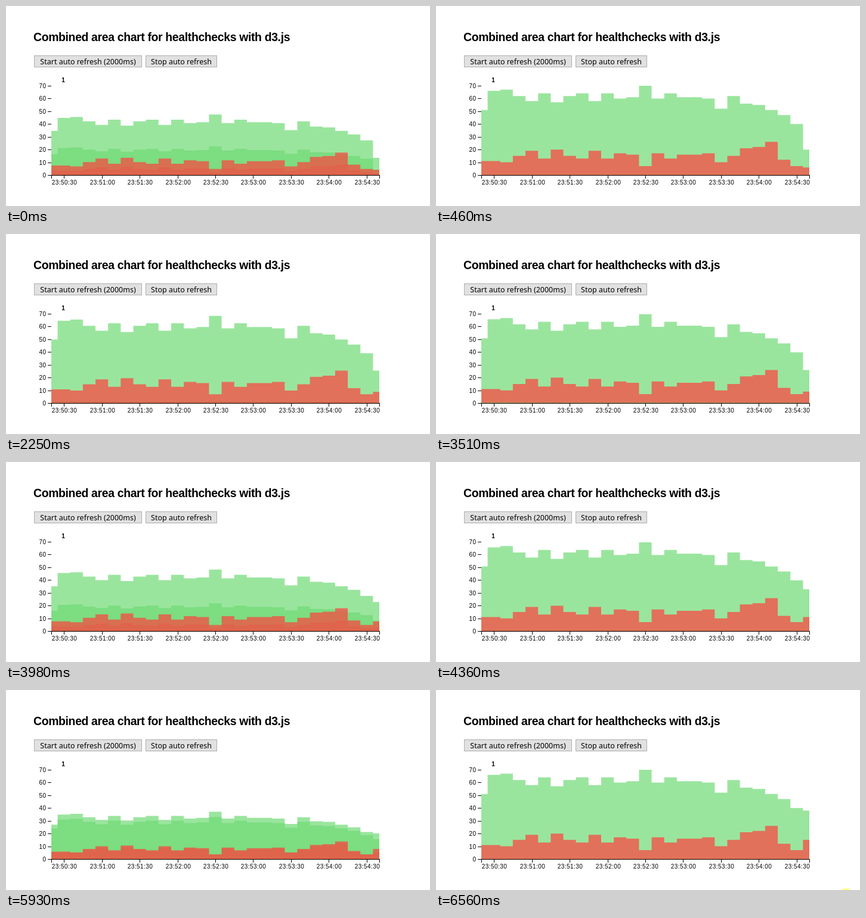
Recreate the animation shown at these times as an HTML page with a canvas. Size 711 by 336 pixels, loop 6.64 s.

```html
<!DOCTYPE html>
<html lang="en">
<head>
<meta charset="utf-8">
<title>Combined area chart</title>
<style>
  html, body { margin: 0; width: 100%; height: 100%; overflow: hidden; background: #fff; }
  canvas, svg { position: absolute; left: 0; top: 0; display: block; }
  text { font-family: "Liberation Sans", Arial, sans-serif; fill: #000; }
  .title { font-size: 19.4px; font-weight: bold; letter-spacing: -0.34px; }
  .button { font: 12.5px "Noto Sans", "Open Sans", sans-serif; text-anchor: middle; }
  .box { fill: #e1e1e1; stroke: #adadad; }
  .axis { font-size: 10px; letter-spacing: 0.42px; }
  .count { font-size: 10px; font-weight: bold; text-anchor: middle; }
  .line { fill: none; stroke: #000; shape-rendering: crispEdges; }
</style>
</head>
<body>
<canvas id="areas" width="711" height="336"></canvas>
<svg id="labels" width="711" height="336" viewBox="0 0 711 336">
  <text class="title" x="46" y="59">Combined area chart for healthchecks with d3.js</text>
  <rect class="box" x="47.5" y="83.5" width="180" height="19"/>
  <text class="button" x="137.5" y="98">Start auto refresh (2000ms)</text>
  <rect class="box" x="234.5" y="83.5" width="119" height="19"/>
  <text class="button" x="294" y="98">Stop auto refresh</text>
  <text class="count" x="96" y="128">1</text>
</svg>
<script>
const LOOP = 6640, STEP = 77.5, DURATION = 1000;
const LEFT = 76, RIGHT = 626, BASE = 284, UNIT = 150 / 70;
const GREEN = "rgba(111,219,118,0.7)", RED = "rgba(255,65,62,0.7)";

const total = [51, 66, 67, 62, 58, 64, 57, 62, 64, 58, 64, 60, 61, 70,
  60, 64, 61, 61, 60, 52, 62, 56, 55, 51, 47, 40];
const failed = [11, 11, 10, 15, 19, 13, 20, 15, 13, 19, 13, 17, 16, 7,
  17, 13, 16, 16, 17, 10, 15, 21, 22, 26, 12, 7];
// newest [total, failed] sample after each refresh
const latest = [[13, 3], [20, 6], [26, 9], [33, 11], [38, 15]];
// first repaint and start time of each transition
const refreshes = [[-7.5, -576], [1470, 1425], [3510, 3402], [5440, 5395]];
const GAP = (RIGHT - LEFT) / total.length;

const ctx = document.getElementById("areas").getContext("2d");
const svg = document.getElementById("labels");

function add(tag, attrs, label = "") {
  const node = document.createElementNS("http://www.w3.org/2000/svg", tag);
  for (const key in attrs) node.setAttribute(key, attrs[key]);
  node.textContent = label;
  svg.append(node);
}

function buildAxes() {
  add("path", { class: "line", d: `M${LEFT + 0.5},290V284.5H${RIGHT + 0.5}V290` });
  for (let v = 0; v <= 70; v += 10) {
    const y = Math.round(BASE - v * UNIT) + 0.5;
    add("path", { class: "line", d: `M70,${y}H76` });
    add("text", { class: "axis", x: 67.4, y: y + 3.5, "text-anchor": "end" }, v);
  }
  for (let i = 0; i < 9; i++) {
    const x = Math.round(LEFT + GAP * (1 + 3 * i)) + 0.5;
    const half = i + 1;
    const label = `23:${50 + (half >> 1)}:${half % 2 ? "30" : "00"}`;
    add("path", { class: "line", d: `M${x},284V290` });
    add("text", { class: "axis", x: x + 0.5, y: 300, "text-anchor": "middle" }, label);
  }
}

function drawArea(values, scale, color) {
  ctx.beginPath();
  ctx.moveTo(LEFT, BASE);
  values.forEach((v, i) => {
    const x = LEFT + i * GAP, y = BASE - v * UNIT * scale;
    ctx.lineTo(Math.max(LEFT, x - GAP / 2), y);
    ctx.lineTo(Math.min(RIGHT, x + GAP / 2), y);
  });
  ctx.lineTo(RIGHT, BASE);
  ctx.fillStyle = color;
  ctx.fill();
}

function drawSample(index, scale) {
  if (scale <= 0) return;
  const [all, bad] = latest[index];
  drawArea([...total, all], scale, GREEN);
  drawArea([...failed, bad], scale, RED);
}

const cubicInOut = p => p < 0.5 ? 4 * p ** 3 : 1 - 4 * (1 - p) ** 3;

function render(time) {
  ctx.clearRect(0, 0, 711, 336);
  const index = refreshes.findLastIndex(r => time >= r[0]);
  const [first, start] = refreshes[index];
  const shown = first + Math.floor((time - first) / STEP + 0.001) * STEP;
  const grow = cubicInOut(Math.min(1, Math.max(0, (shown - start) / DURATION)));
  drawSample(index, 1 - grow);
  drawSample(index + 1, grow);

  // pointer highlight entering at the bottom edge
  if (time >= 6560) {
    ctx.fillStyle = "#ffff80";
    ctx.beginPath();
    ctx.arc(688, 345.2, 12.2, 0, Math.PI * 2);
    ctx.fill();
  }
}

function tick() {
  render(performance.now() % LOOP);
  requestAnimationFrame(tick);
}

buildAxes();
tick();
</script>
</body>
</html>
```
